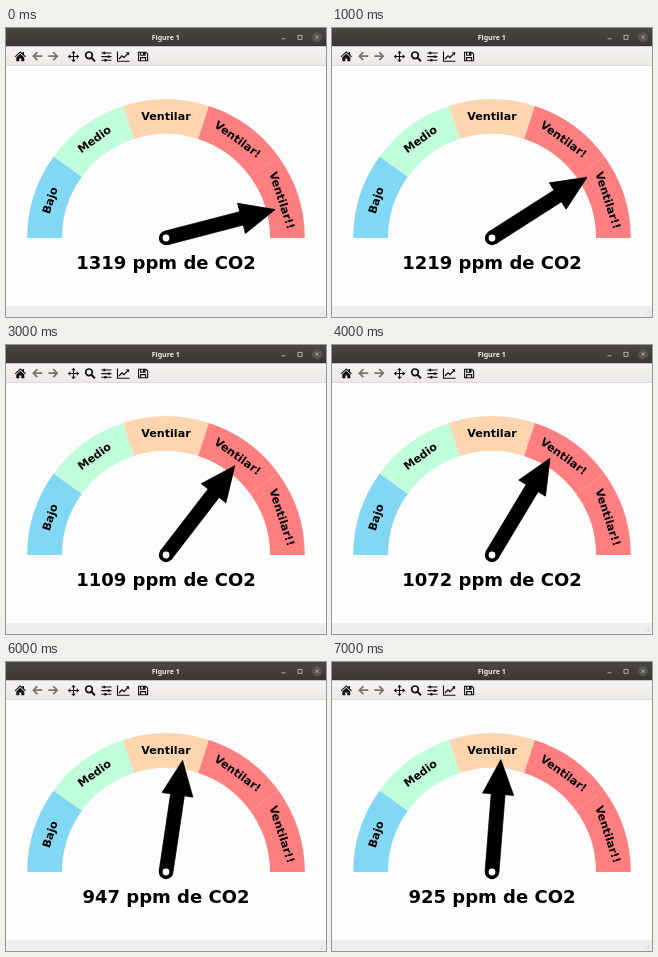
Recreate the animation shown at these times as an HTML page. Size 320 px wide and 289 px high, loop 8 s.

```html
<!DOCTYPE html>
<html lang="es">
<head>
<meta charset="utf-8">
<title>CO2</title>
<style>
  html, body { margin: 0; width: 100%; height: 100%; overflow: hidden; background: #fdfdfe; }
  svg { display: block; width: 320px; height: 289px; }
  text { text-anchor: middle; font-weight: bold; }
  .plot text { font-family: "DejaVu Sans", sans-serif; font-size: 11.1px; fill: #000; }
  .plot #reading { font-size: 18px; }
  .title { font: bold 7px "Noto Sans", "Open Sans", sans-serif; fill: #f0eeea; }
  .line { fill: none; stroke: #111; stroke-width: 1.1; }
  .win { fill: none; stroke: #c9c7c2; stroke-width: .8; }
</style>
</head>
<body>
<svg viewBox="0 0 320 289">
  <defs>
    <linearGradient id="bar" x2="0" y2="1">
      <stop offset="0" stop-color="#4a4744"/>
      <stop offset="1" stop-color="#383532"/>
    </linearGradient>
    <linearGradient id="tools" x2="0" y2="1">
      <stop offset="0" stop-color="#f6f4f2"/>
      <stop offset="1" stop-color="#ebe8e5"/>
    </linearGradient>
  </defs>
  <rect width="320" height="289" fill="#fdfdfe"/>
  <rect width="320" height="18.5" fill="url(#bar)"/>
  <rect y="18.5" width="320" height="19" fill="url(#tools)"/>
  <path d="M0 37.5H320" stroke="#d9d5d1" stroke-width=".8"/>
  <rect y="278" width="320" height="11" fill="#f0eeec"/>
  <path d="M314 287l4-4M316.5 287l1.5-1.5" stroke="#c8c4c0" stroke-width=".6"/>
  <text class="title" x="159.7" y="12">Figure 1</text>

  <g class="win">
    <path d="M275.5 10.8h4"/>
    <rect x="292" y="7.3" width="4" height="4"/>
    <circle cx="311" cy="9.3" r="4.6" stroke="#6a6763" fill="#55524e" stroke-width=".5"/>
    <path d="M309.2 7.5l3.6 3.6M312.8 7.5l-3.6 3.6"/>
  </g>

  <g fill="#111">
    <path d="M14.3 23.3L8.7 28.4l.7.8 4.9-4.4 4.9 4.4.7-.8-1.9-1.8v-2.5h-1.5v1.2zM14.3 25.8l-4 3.6v3.8h3v-2.8h2v2.8h3v-3.8z"/>
    <g id="arrow" fill="none" stroke="#77736f" stroke-width="1.7">
      <path d="M31.4 24.2l-4 4 4 4M27.6 28.2h8.6"/>
    </g>
    <use href="#arrow" transform="matrix(-1 0 0 1 78.6 0)"/>
    <path class="line" d="M67.5 24.5v8M63.5 28.5h8" stroke-width="1.4"/>
    <path d="M67.5 22.8l2.2 2.5h-4.4zM67.5 34.2l2.2-2.5h-4.4zM61.8 28.5l2.5-2.2v4.4zM73.2 28.5l-2.5-2.2v4.4z"/>
    <circle class="line" cx="83" cy="27.3" r="3.3" style="stroke-width:1.7"/>
    <path class="line" d="M85.5 29.8l3.4 3.6" style="stroke-width:2"/>
    <path class="line" d="M95.3 25h10.2M95.3 28.6h10.2M95.3 32.2h10.2"/>
    <path d="M97.3 23.8h2v2.4h-2zM101.8 27.4h2v2.4h-2zM98.4 31h2v2.4h-2z"/>
    <path class="line" d="M111.5 23.5v9.7h12" />
    <path class="line" d="M113 31l3-3.2 2 1.8 4-4.2" style="stroke-width:1.3"/>
    <path d="M119.8 24.2h3.3v3.3z"/>
    <path class="line" d="M132.6 24.2h7.2l1.8 1.8v6.8h-9zM134.6 24.5v2.8h4.4v-2.8M134.6 32.5v-2.9h5v2.9"/>
    <path d="M137 24h2v3h-2z"/>
  </g>

  <g class="plot">
    <g id="dial"></g>
    <g id="needle" transform="translate(160 210)">
      <path stroke="#000" stroke-width=".7" d="M0-6.95H78V-15.6L112.8 0 78 15.6V6.95H0z"/>
    </g>
    <circle cx="160" cy="210" r="7.2"/>
    <circle cx="160" cy="210" r="3.4" fill="#fff"/>
    <text id="reading" x="160" y="241"></text>
  </g>
</svg>
<script>
  const CX = 160, CY = 210, OUTER = 138.8, INNER = 104, LABEL = 121.5;
  const STEP = 1000;
  const ppm = [1319, 1219, 1158, 1109, 1072, 978, 947, 925];
  const zones = [
    ['Bajo', '#82d8f4'],
    ['Medio', '#c0fdda'],
    ['Ventilar', '#fdd6b0'],
    ['Ventilar!', '#ff7f80'],
    ['Ventilar!!', '#ff7f80']
  ];
  const $ = id => document.getElementById(id);

  function add(name, attrs, text = '') {
    const el = document.createElementNS('http://www.w3.org/2000/svg', name);
    for (const key in attrs) el.setAttribute(key, attrs[key]);
    el.textContent = text;
    $('dial').append(el);
  }

  // Degrees run clockwise from the left end of the dial.
  function at(r, deg) {
    const a = deg * Math.PI / 180;
    return `${(CX - r * Math.cos(a)).toFixed(2)} ${(CY - r * Math.sin(a)).toFixed(2)}`;
  }

  const span = 180 / zones.length;
  zones.forEach(([, fill], i) => {
    const a = i * span, b = a + span;
    add('path', {
      fill,
      d: `M${at(OUTER, a)}A${OUTER} ${OUTER} 0 0 1 ${at(OUTER, b)}` +
         `L${at(INNER, b)}A${INNER} ${INNER} 0 0 0 ${at(INNER, a)}z`
    });
  });
  zones.forEach(([label], i) => {
    const mid = (i + .5) * span;
    add('text', { y: 3.4, transform: `translate(${at(LABEL, mid)}) rotate(${mid - 90})` }, label);
  });

  let shown = -1;
  function draw(now) {
    const i = Math.floor(now / STEP) % ppm.length;
    if (i !== shown) {
      shown = i;
      const angle = (ppm[i] - 400) * .18 - 180;
      $('needle').setAttribute('transform', `translate(${CX} ${CY}) rotate(${angle})`);
      $('reading').textContent = `${ppm[i]} ppm de CO2`;
    }
  }

  const start = performance.now();
  function tick() {
    draw(performance.now() - start);
    requestAnimationFrame(tick);
  }
  tick();
</script>
</body>
</html>
```
